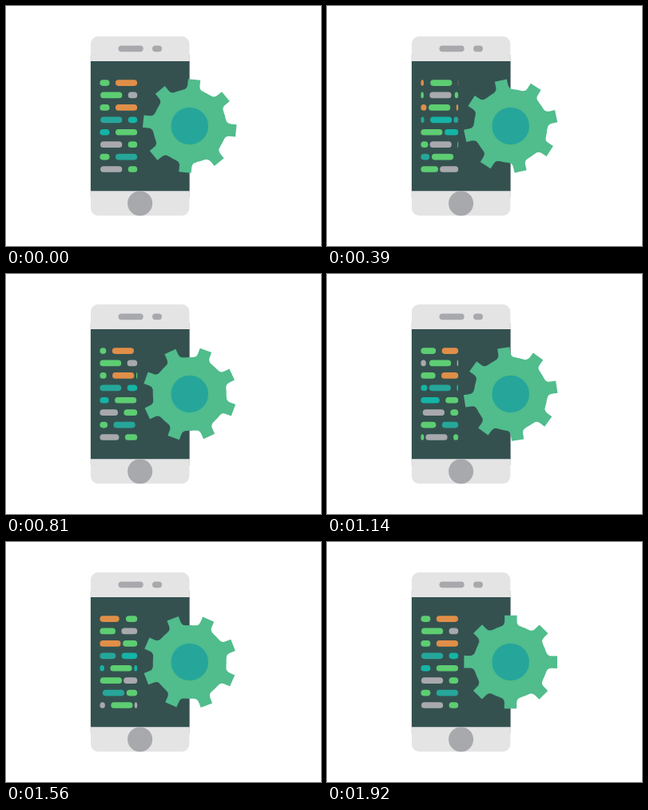
These frames come from a looping animation (394x300 px, 1950 ms). An HTML page:

```html
<!DOCTYPE html>
<html lang="en">
<head>
<meta charset="utf-8">
<title>Mobile app development</title>
<style>
  html, body { margin: 0; width: 100%; height: 100%; overflow: hidden; background: #fff; }
  svg { display: block; }
</style>
</head>
<body>
<svg width="394" height="300" viewBox="0 0 394 300">
  <path fill="#d6d8d8" d="M105.5 61h124.5v178h-124.5z"/>
  <rect x="106" y="38" width="123.3" height="224" rx="9" fill="#e4e4e4"/>
  <path fill="#345150" d="M106 69h123.5v162.2H106z"/>
  <g fill="#a8a9ad">
    <rect x="140.5" y="49.4" width="31.2" height="7.8" rx="3.9"/>
    <rect x="183" y="49.4" width="12" height="7.8" rx="3.9"/>
    <circle cx="167.6" cy="246.7" r="15.5"/>
  </g>
  <g id="code"></g>
  <g transform="translate(229.7 150)">
    <g id="gear" fill="#51bc8c">
      <circle r="46"/>
      <path id="tooth" d="M-7.7-58.3H7.7V-51Q7.7-45.5 13.5-44L0-30L-13.5-44Q-7.7-45.5-7.7-51Z"/>
    </g>
    <circle r="23.3" fill="#26a69a"/>
  </g>
</svg>
<script>
const LOOP = 1950, LEFT = 117.4, RIGHT = 164.2, PILL = 27.2;
const green = '#5dcd72', orange = '#e08e48', grey = '#a8a9ad', teal = '#26a69a', aqua = '#14b4a6';

// first pill x, repeat distance, two colours, horizontal bezier handles
const rows = [
  [102.2, 70, green, orange, .333, .667],
  [118, 66, green, grey, .333, .28],
  [102.2, 64.5, green, orange, .333, .667],
  [118, 64, teal, aqua, .333, .28],
  [102.2, 64.5, aqua, green, .333, .19],
  [118, 64, grey, green, .72, .667],
  [102.2, 64.5, green, teal, .333, .55],
  [118, 64, grey, green, .37, .667]
];

const svgNS = 'http://www.w3.org/2000/svg';
function add(parent, tag, attrs) {
  const el = parent.appendChild(document.createElementNS(svgNS, tag));
  for (const k in attrs) el.setAttribute(k, attrs[k]);
  return el;
}

// cubic-bezier(a, 0, b, 1)
function ease(p, a, b) {
  let lo = 0, hi = 1, s;
  for (let i = 0; i < 24; i++) {
    s = (lo + hi) / 2;
    const r = 1 - s;
    if (3 * a * s * r * r + 3 * b * s * s * r + s ** 3 < p) lo = s; else hi = s;
  }
  return s * s * (3 - 2 * s);
}

const gear = document.getElementById('gear');
for (let i = 1; i < 8; i++) add(gear, 'use', { href: '#tooth', transform: `rotate(${i * 45})` });

const code = document.getElementById('code');
const pills = [];
rows.forEach(([x, period, first, second], row) => {
  for (const start of [x - period, x])
    [first, second].forEach((fill, i) => pills.push({
      row, x: start + i * 34.6,
      el: add(code, 'rect', { y: 92.2 + row * 15.42, height: 7.7, rx: 3.85, ry: 3.85, fill })
    }));
});

function draw(t) {
  gear.setAttribute('transform', `rotate(${(t + 30) / LOOP * 360})`);
  const p = (t + 22) / LOOP * 2 % 1;
  const shifts = rows.map(([, period, , , a, b]) => period * ease(p, a, b));
  for (const { row, x, el } of pills) {
    const from = Math.max(LEFT, x + shifts[row]);
    const to = Math.min(RIGHT, x + shifts[row] + PILL);
    el.setAttribute('x', from);
    el.setAttribute('width', Math.max(0, to - from));
  }
}

const begin = performance.now();
function tick() {
  draw((performance.now() - begin) % LOOP);
  requestAnimationFrame(tick);
}
tick();
</script>
</body>
</html>
```
